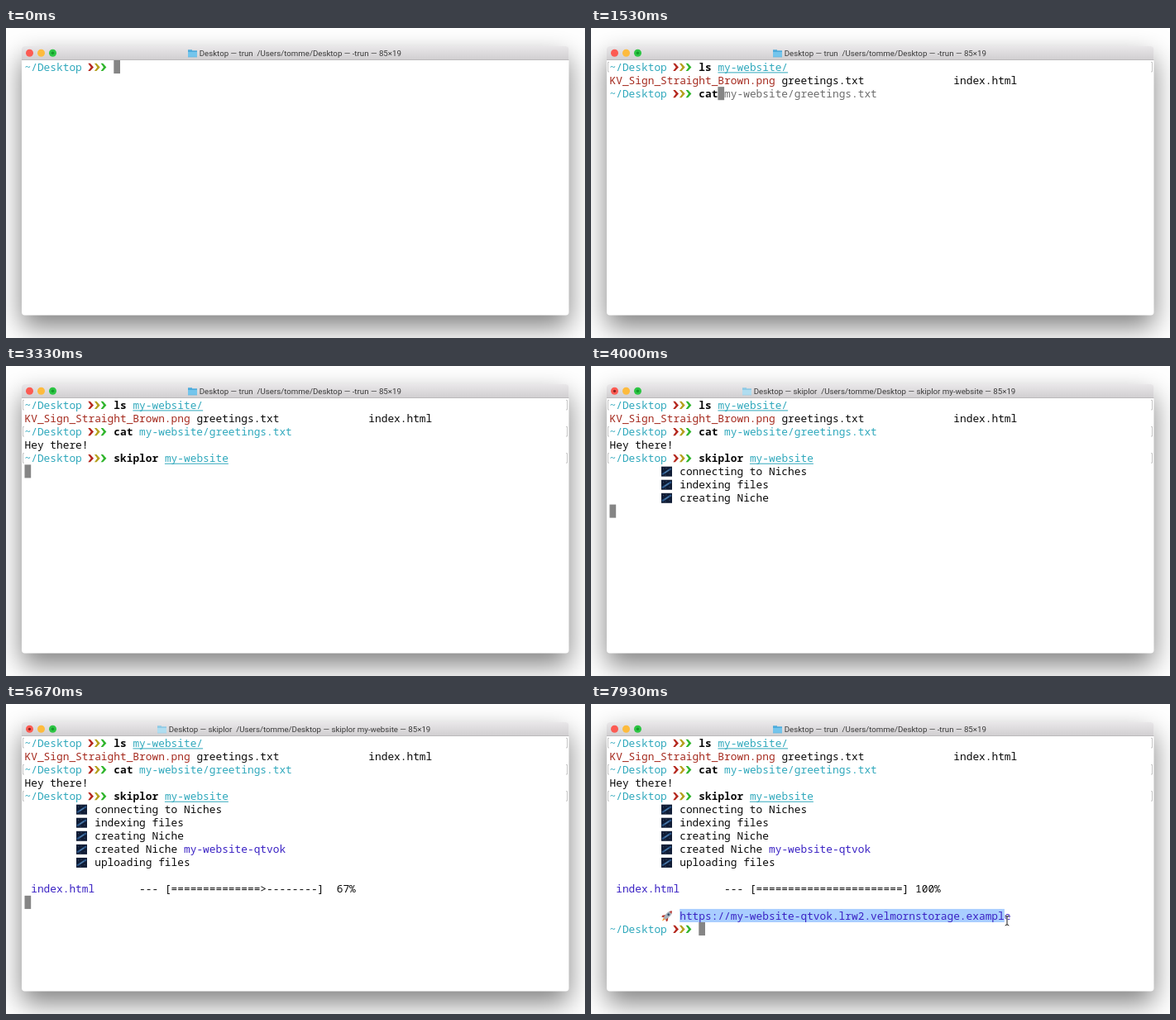
Recreate the animation shown at these times as an HTML page with a canvas. Size 700 by 375 pixels, loop 8 s.

```html
<!DOCTYPE html>
<html lang="en">
<head>
<meta charset="utf-8">
<title>Terminal session</title>
<style>
  html, body { margin: 0; width: 100%; height: 100%; overflow: hidden; background: #fff; }
  canvas { display: block; }
</style>
</head>
<body>
<canvas id="stage" width="700" height="375"></canvas>
<script>
const ctx = document.getElementById('stage').getContext('2d');
const LOOP = 8000;
const CELL = { x: 22.5, y: 39, w: 7.7, h: 16.07 };
const MONO = '12.83px "Noto Sans Mono", monospace';
const BOLD = 'bold ' + MONO;
const COLOR = {
  black: '#0a0a0a', cyan: '#2fa8bc', red: '#a52a1e', error: '#e03a30',
  hint: '#6c6c6c', violet: '#3a22c4', cursor: '#858585', select: '#a9ceff'
};
const PROMPT_COLS = 14;
const URL = 'https://my-website-qtvok.lrw2.velmornstorage.example';
const URL_ROW = 13, URL_COL = 11;

// keys: [time, number of characters typed]
const commands = [
  { row: 0, ready: 0, enter: 870, cmd: 'ls', arg: ' my-website/', underline: true,
    keys: [[400, 1], [533, 2], [600, 3], [730, 14]] },
  { row: 2, ready: 1000, enter: 1870, cmd: 'cat', arg: ' my-website/greetings.txt',
    keys: [[1270, 1], [1400, 2], [1530, 3], [1670, 4], [1730, 28]] },
  { row: 4, ready: 2000, enter: 3330, cmd: 'skiplor', arg: ' my-website', underline: true,
    keys: [[2930, 1], [3000, 2], [3067, 3], [3133, 18]] },
  { row: 14, ready: 6267, enter: Infinity, cmd: '', arg: '', keys: [] }
];

const outputs = [
  [930, 1, () => {
    text(1, 0, 'KV_Sign_Straight_Brown.png', COLOR.red);
    text(1, 27, 'greetings.txt');
    text(1, 54, 'index.html');
  }],
  [1930, 3, () => text(3, 0, 'Hey there!')],
  [3400, 5, () => step(5, 'connecting to Niches')],
  [3467, 6, () => step(6, 'indexing files')],
  [3600, 7, () => step(7, 'creating Niche')],
  [4400, 8, () => {
    step(8, 'created Niche');
    text(8, 25, 'my-website-qtvok', COLOR.violet);
  }],
  [4533, 9, () => step(9, 'uploading files')],
  [4667, 11, progress],
  [6200, URL_ROW, t => {
    const picked = selectedChars(t);
    if (picked) {
      ctx.fillStyle = COLOR.select;
      ctx.fillRect(colX(URL_COL), rowY(URL_ROW), picked * CELL.w, CELL.h);
    }
    rocket(92, rowY(URL_ROW) + 8.5);
    text(URL_ROW, URL_COL, URL, COLOR.violet);
  }]
];

// [time, x, y]
const pointerPath = [
  [6670, 160, 319], [6800, 139, 288], [7000, 120.5, 264], [7250, 111, 260],
  [7470, 107.5, 259], [7600, 160, 259], [7800, 430, 261], [7930, 503, 262]
];

const colX = col => CELL.x + col * CELL.w;
const rowY = row => CELL.y + row * CELL.h;
const latest = (steps, t, start) => steps.reduce((v, [at, n]) => t >= at ? n : v, start);

function text(row, col, str, color = COLOR.black, font = MONO) {
  ctx.font = font;
  ctx.fillStyle = color;
  ctx.fillText(str, colX(col), rowY(row) + 12.6);
}

function disc(x, y, r, color) {
  ctx.fillStyle = color;
  ctx.beginPath();
  ctx.arc(x, y, r, 0, Math.PI * 2);
  ctx.fill();
}

function polygon(points, color) {
  ctx.fillStyle = color;
  ctx.beginPath();
  points.forEach(([x, y]) => ctx.lineTo(x, y));
  ctx.fill();
}

function polyline(points, color, width) {
  ctx.strokeStyle = color;
  ctx.lineWidth = width;
  ctx.beginPath();
  points.forEach(([x, y]) => ctx.lineTo(x, y));
  ctx.stroke();
}

function frame(busy) {
  ctx.fillStyle = '#fff';
  ctx.fillRect(0, 0, 700, 375);

  ctx.save();
  ctx.shadowColor = 'rgba(0,0,0,.5)';
  ctx.shadowBlur = 32;
  ctx.shadowOffsetY = 14;
  ctx.beginPath();
  ctx.roundRect(19, 22, 661.5, 325.5, 4);
  ctx.fill();
  ctx.restore();

  const bar = ctx.createLinearGradient(0, 22, 0, 38);
  bar.addColorStop(0, '#e9e7e9');
  bar.addColorStop(1, '#d1cfd1');
  ctx.fillStyle = bar;
  ctx.beginPath();
  ctx.roundRect(19, 22, 661.5, 16.5, [4, 4, 0, 0]);
  ctx.fill();
  ctx.fillStyle = '#b2b0b2';
  ctx.fillRect(19, 38, 661.5, 0.8);

  ['#fc5b53', '#fdbb3d', '#2dc544'].forEach((c, i) => disc(28.5 + i * 14, 30.3, 4.5, c));
  disc(56.5, 30.3, 1.8, '#159a2b');
  if (busy) disc(28.5, 30.3, 1.6, '#86201b');

  const x = busy ? 183 : 220;
  ctx.fillStyle = busy ? '#8fcbe6' : '#4cabdc';
  ctx.fillRect(x, 26.3, 5, 3);
  ctx.fillRect(x, 27.3, 11, 8);
  ctx.fillStyle = busy ? '#b0ddf0' : '#74c5ec';
  ctx.fillRect(x, 29, 11, 5.8);

  const app = busy ? 'skiplor' : 'trun';
  const job = busy ? 'skiplor my-website' : '-trun';
  ctx.font = '9.7px Roboto, sans-serif';
  ctx.fillStyle = '#3a3a3a';
  ctx.fillText(`Desktop — ${app}\u00a0 /Users/tomme/Desktop — ${job} — 85×19`, x + 13.7, 33.8);
}

function prompt(row, entered) {
  text(row, 0, '~/Desktop', COLOR.cyan);
  const y = rowY(row) + 8.4;
  ['#b5291f', '#b5a01e', '#2fb52c'].forEach((color, i) => {
    const x = colX(10 + i) - 0.3;
    polygon([[x, y - 4.6], [x + 2.6, y - 4.6], [x + 6.8, y], [x + 2.6, y + 4.6],
      [x, y + 4.6], [x + 3.4, y]], color);
  });
  if (!entered) return;
  const top = y - 6, bottom = y + 5.5;
  polyline([[22, top], [20.5, top], [20.5, bottom], [22, bottom]], '#b8b8b8', 0.8);
  polyline([[677, top], [678.5, top], [678.5, bottom], [677, bottom]], '#b8b8b8', 0.8);
}

function cursor(row, col) {
  ctx.fillStyle = COLOR.cursor;
  ctx.fillRect(colX(col), rowY(row), CELL.w, CELL.h);
}

function command({ row, enter, cmd, arg, underline, keys }, t) {
  const line = cmd + arg;
  const count = latest(keys, t, 0);
  const typed = line.slice(0, count);
  const path = typed.slice(cmd.length);
  prompt(row, t >= enter);
  if (t < enter) cursor(row, PROMPT_COLS + count);
  if (count >= cmd.length) text(row, PROMPT_COLS, cmd, COLOR.black, BOLD);
  else text(row, PROMPT_COLS, typed, COLOR.error);
  text(row, PROMPT_COLS + cmd.length, path, COLOR.cyan);
  if (underline && path.length > 1) {
    ctx.fillStyle = COLOR.cyan;
    ctx.fillRect(colX(PROMPT_COLS + cmd.length + 1), rowY(row) + 14.4, (path.length - 1) * CELL.w, 1);
  }
  if (count) text(row, PROMPT_COLS + count, line.slice(count), COLOR.hint);
}

function step(row, label) {
  const x = 85, y = rowY(row) + 2.3;
  ctx.fillStyle = '#101c35';
  ctx.fillRect(x, y, 13, 12);
  polyline([[x + 1, y + 9.5], [x + 5, y + 7], [x + 8, y + 5], [x + 12, y + 2.5]], '#2b5688', 2.2);
  polyline([[x + 4, y + 7.6], [x + 9, y + 4.4]], '#6d97bd', 0.8);
  [[2.5, 3], [6, 2], [10, 8.5], [5, 10.3]].forEach(([dx, dy]) => disc(x + dx, y + dy, 0.45, '#7793b5'));
  text(row, URL_COL, label);
}

function progress(t) {
  const percent = latest([[5200, 33], [5470, 67], [6130, 100]], t, 0);
  const width = 23;
  const filled = Math.floor(width * percent / 100);
  const head = percent === 100 ? '=' : '>';
  const bar = (filled ? '='.repeat(filled - 1) + head : '').padEnd(width, '-');
  text(11, 1, t < 5200 ? 'greetings.txt' : 'index.html', COLOR.violet);
  text(11, 18, `--- [${bar}] ${String(percent).padStart(3)}%`);
}

function rocket(x, y) {
  ctx.save();
  ctx.translate(x, y);
  ctx.rotate(Math.PI / 4);
  polygon([[-1.6, 4], [1.6, 4], [0, 8.5]], '#f39a2d');
  polygon([[-2, 0], [-4.6, 3.5], [-4, 5.5], [-1.5, 4]], '#b8382f');
  polygon([[2, 0], [4.6, 3.5], [4, 5.5], [1.5, 4]], '#b8382f');
  ctx.fillStyle = '#a9b1ba';
  ctx.beginPath();
  ctx.ellipse(0, -1.5, 2.7, 6.5, 0, 0, Math.PI * 2);
  ctx.fill();
  polygon([[-1.9, -5.6], [0, -8.6], [1.9, -5.6]], '#c8423a');
  disc(0, -2.4, 1.4, '#35506c');
  ctx.restore();
}

function pointerAt(t) {
  const next = pointerPath.findIndex(p => p[0] > t);
  if (next === 0) return null;
  if (next < 0) return pointerPath.at(-1).slice(1);
  const [t0, x0, y0] = pointerPath[next - 1];
  const [t1, x1, y1] = pointerPath[next];
  const k = (t - t0) / (t1 - t0);
  return [x0 + (x1 - x0) * k, y0 + (y1 - y0) * k];
}

function selectedChars(t) {
  if (t < 7470) return 0;
  return Math.max(0, Math.floor((pointerAt(t)[0] - colX(URL_COL)) / CELL.w));
}

function pointer(x, y) {
  for (const [color, width] of [['rgba(255,255,255,.7)', 2.4], ['#1c1c1c', 1]]) {
    polyline([[x, y - 5], [x, y + 5]], color, width);
    polyline([[x - 2.3, y - 6], [x, y - 4.8], [x + 2.3, y - 6]], color, width);
    polyline([[x - 2.3, y + 6], [x, y + 4.8], [x + 2.3, y + 6]], color, width);
  }
}

function draw(t) {
  frame(t >= 3400 && t < 6267);
  const shownCommands = commands.filter(c => t >= c.ready);
  const shownOutputs = outputs.filter(([at]) => t >= at);
  shownOutputs.forEach(([, , paint]) => paint(t));
  shownCommands.forEach(c => command(c, t));

  const current = shownCommands.at(-1);
  if (t >= current.enter) {
    const lastRow = Math.max(current.row, ...shownOutputs.map(([, row]) => row));
    cursor(lastRow + 1, 0);
  }
  const spot = pointerAt(t);
  if (spot) pointer(...spot);
}

function tick() {
  draw(performance.now() % LOOP);
  requestAnimationFrame(tick);
}
tick();
</script>
</body>
</html>
```
